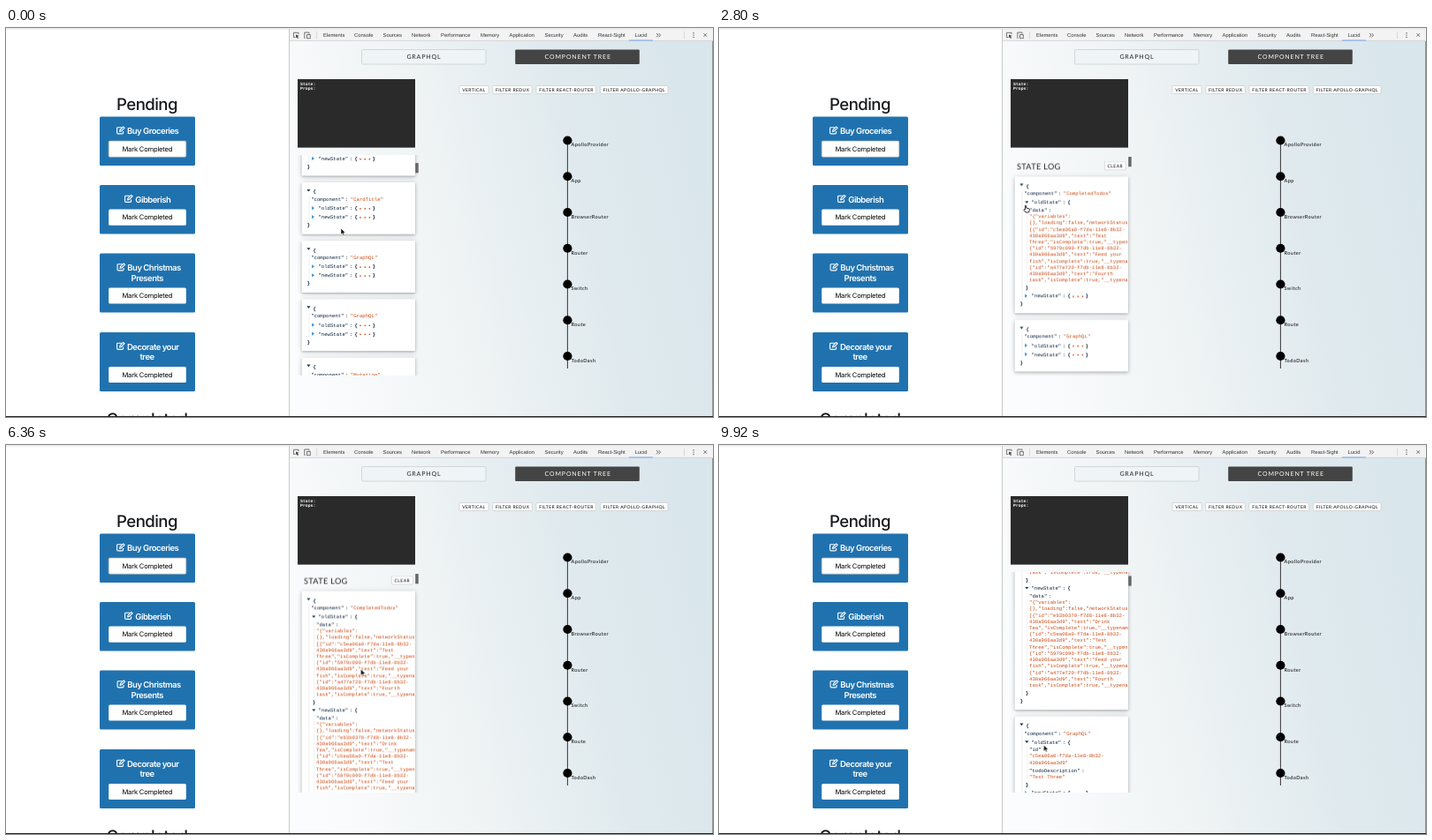
Recreate the animation shown at these times as an HTML page. Size 800 by 441 pixels, loop 10 s.

```html
<!DOCTYPE html>
<html lang="en">
<head>
<meta charset="utf-8">
<title>State log</title>
<style>
html, body { margin: 0; width: 100%; height: 100%; overflow: hidden; background: #fff; }
svg { display: block; width: 800px; height: 441px; text-rendering: geometricPrecision; }
text { white-space: pre; }
.ui { font-family: Inter, sans-serif; }
.head { font-size: 18.6px; font-weight: 500; letter-spacing: -.55px; fill: #16181b; text-anchor: middle; }
.title { font-size: 9.5px; font-weight: 600; letter-spacing: -.5px; fill: #fff; }
.mark { font-size: 7.6px; letter-spacing: -.2px; fill: #000; text-anchor: middle; }
.tab { font: 5.85px "Liberation Sans", Arial, sans-serif; fill: #333; }
.caps { font-family: Lato, sans-serif; fill: #222; }
.big { font-size: 7px; letter-spacing: .85px; }
.small { font-size: 5px; letter-spacing: .43px; fill: #000; }
.node { font: 5.6px Lato, sans-serif; letter-spacing: .43px; fill: #000; }
.con { font: bold 4.8px "Liberation Mono", monospace; fill: #fff; }
.code { font: 5.65px "Liberation Mono", "Courier New", monospace; }
.key { fill: #0a2340; }
.brace { fill: #0a2340; font-weight: bold; }
.str { fill: #cb4b16; }
.card { fill: #fff; filter: drop-shadow(0 1.5px 1.2px rgba(0, 0, 0, .24)) drop-shadow(0 1px 3px rgba(0, 0, 0, .16)); }
.guide { stroke: #e6e6e6; stroke-width: .6px; }

#list, #thumb, #pointer, #arrow, #hand, .view { animation: 10s linear infinite; }
#list { animation-name: scroll; }
#thumb { animation-name: thumb; }
#pointer { animation-name: move; }
#arrow, #hand, .view { animation-timing-function: step-end; }
#arrow { animation-name: arrow; }
#hand { animation-name: hand; }
#view0 { animation-name: v0; }
#view1 { animation-name: v1; }
#view2 { animation-name: v2; }
#view3 { animation-name: v3; }

@keyframes scroll {
  0% { transform: translateY(-256.3px); animation-timing-function: ease-out; }
  3% { transform: translateY(-620px); }
  4.2% { transform: translateY(-610px); }
  5.6% { transform: translateY(-540px); animation-timing-function: ease-out; }
  8.8%, 63% { transform: translateY(0); animation-timing-function: ease-in-out; }
  69%, 100% { transform: translateY(-141.3px); }
}
@keyframes thumb {
  0% { transform: translateY(7px); animation-timing-function: ease-out; }
  3% { transform: translateY(16.2px); }
  4.2% { transform: translateY(16px); }
  5.6% { transform: translateY(14px); animation-timing-function: ease-out; }
  8.8%, 63% { transform: translateY(0); animation-timing-function: ease-in-out; }
  69%, 100% { transform: translateY(2.5px); }
}
@keyframes move {
  0%, 10% { transform: translate(379px, 227px); animation-timing-function: ease-in-out; }
  20%, 31% { transform: translate(347px, 201px); animation-timing-function: ease-in-out; }
  40%, 51% { transform: translate(335px, 290px); animation-timing-function: ease-in-out; }
  54%, 57.5% { transform: translate(347px, 303px); animation-timing-function: ease-in-out; }
  62%, 74% { transform: translate(401.5px, 254px); animation-timing-function: ease-in-out; }
  84%, 89% { transform: translate(348px, 337px); animation-timing-function: ease-in-out; }
  94%, 100% { transform: translate(367.5px, 340px); }
}
@keyframes arrow {
  0%, 32%, 58%, 90%, 100% { opacity: 1; }
  19%, 53.4%, 83% { opacity: 0; }
}
@keyframes hand {
  0%, 32%, 58%, 90%, 100% { opacity: 0; }
  19%, 53.4%, 83% { opacity: 1; }
}
@keyframes v0 { 0% { opacity: 1; } 22%, 100% { opacity: 0; } }
@keyframes v1 { 0%, 56%, 100% { opacity: 0; } 22% { opacity: 1; } }
@keyframes v2 { 0%, 86%, 100% { opacity: 0; } 56% { opacity: 1; } }
@keyframes v3 { 0% { opacity: 0; } 86%, 100% { opacity: 1; } }
</style>
</head>
<body>
<svg viewBox="0 0 800 441">
  <defs>
    <linearGradient id="sky" x1="0" y1=".6" x2="1" y2=".4">
      <stop offset="0" stop-color="#fbfcfd"/>
      <stop offset=".35" stop-color="#f0f4f5"/>
      <stop offset=".7" stop-color="#e0eaee"/>
      <stop offset="1" stop-color="#d9e6ec"/>
    </linearGradient>
    <clipPath id="pane"><rect x="330" y="144" width="137" height="250"/></clipPath>
    <clipPath id="inner"><rect x="334" y="0" width="129" height="2000"/></clipPath>
    <g id="edit" fill="none" stroke="#fff" stroke-width="1.1">
      <path d="M6 1.2H1.8Q.6 1.2 .6 2.4V7.2Q.6 8.4 1.8 8.4H6.4Q7.6 8.4 7.6 7.2V5.4"/>
      <path d="M3.6 5.8 4 4 7.7.4 9.1 1.8 5.4 5.4Z"/>
    </g>
  </defs>
  <rect width="800" height="441" fill="#fff"/>
  <g id="todo" class="ui"></g>

  <rect x="320" y="14" width="480" height="427" fill="url(#sky)"/>
  <rect x="320" y="1.5" width="480" height="13" fill="#f3f3f3"/>
  <path d="M320 14.4H800M351.5 4V12.5M767.5 4V12.5" stroke="#ccc" stroke-width=".7"/>
  <path d="M0 1H800" stroke="#ddd"/>
  <path d="M320.5 1V440" stroke="#c8c8c8"/>
  <rect x="705" y="13.6" width="27" height=".8" fill="#5b93ea"/>
  <g fill="none" stroke="#555" stroke-width=".8">
    <path d="M327.5 10.5H325.5V5.3H331V7"/>
    <path d="M328 7.5 331.8 9 330 9.6 331 11.6 329.8 12 329 10.2 328 11Z" fill="#444" stroke="none"/>
    <path d="M338.5 11.5H337.8V5H343V6.5M340.5 7.5H344.3V11.7H340.5Z"/>
    <path d="M789.4 6.2 793 9.8M793 6.2 789.4 9.8"/>
  </g>
  <g fill="#555"><circle cx="778" cy="5.7" r=".7"/><circle cx="778" cy="8.1" r=".7"/><circle cx="778" cy="10.5" r=".7"/></g>
  <g id="tabs"></g>
  <path d="M736 6 738 8.2 736 10.4M738.6 6 740.6 8.2 738.6 10.4" fill="none" stroke="#444" stroke-width=".8"/>

  <rect x="402.5" y="24.5" width="140.5" height="16.5" rx="1" fill="#eff4f6" stroke="#c9d0d4" stroke-width=".8"/>
  <rect x="576.2" y="24.5" width="140.6" height="16.6" rx="1" fill="#444"/>
  <text class="caps big" x="453.4" y="35.4">GRAPHQL</text>
  <text class="caps big" x="609.6" y="35.4" style="fill:#fff">COMPONENT TREE</text>
  <g id="filters"></g>

  <rect x="330" y="58" width="133" height="77.6" fill="#2a2a2a"/>
  <text class="con" x="333" y="64.9">State:</text>
  <text class="con" x="333" y="70.1">Props:</text>
  <g id="tree"></g>

  <g clip-path="url(#pane)">
    <g id="list">
      <text class="caps" x="337" y="160.4" style="font-size:9.2px;letter-spacing:.3px">STATE LOG</text>
      <rect x="436.3" y="151.4" width="24" height="9.4" rx="1" fill="#fff" stroke="#c4c4c4" stroke-width=".6"/>
      <text class="caps small" x="439.6" y="157.9">CLEAR</text>
    </g>
    <rect id="thumb" x="463.2" y="146" width="3.5" height="11.3" rx=".6" fill="#666"/>
  </g>

  <path d="M799.6 15V441" stroke="#777" stroke-width=".8"/>
  <path d="M0 440.5H800" stroke="#222"/>

  <g id="pointer" stroke="#fff" stroke-width=".6">
    <path id="arrow" d="M0 0V7.2L1.6 5.7 2.7 8.2 3.9 7.7 2.8 5.3H5Z" fill="#000"/>
    <path id="hand" d="M-.6 .4Q0-.4 .6 .4V3L3.6 3.7Q4.4 4 4.3 5L3.7 8H0L-2.2 5.2Q-2 4.2-.6 5Z" fill="#fff" stroke="#000" stroke-width=".8"/>
  </g>
</svg>
<script>
const $ = id => document.getElementById(id);

function add(parent, tag, attrs, content) {
  const el = document.createElementNS('http://www.w3.org/2000/svg', tag);
  for (const k in attrs) el.setAttribute(k, attrs[k]);
  if (content) el.textContent = content;
  parent.appendChild(el);
  return el;
}
const text = (parent, cls, x, y, s) => add(parent, 'text', { class: cls, x, y }, s);
const box = (parent, x, y, width, height, attrs) =>
  add(parent, 'rect', { x, y, width, height, ...attrs });

// To-do column
const todo = $('todo');
text(todo, 'head', 159.5, 93.2, 'Pending');
text(todo, 'head', 159.5, 450, 'Completed');
[
  [100.5, 125, ['Buy Groceries', 137]],
  [178, 134, ['Gibberish', 146.3]],
  [255.5, 125.5, ['Buy Christmas', 137.3], ['Presents', 141.5]],
  [345, 125, ['Decorate your', 137], ['tree', 151.5]]
].forEach(([y, iconX, ...lines], i) => {
  const extra = (lines.length - 1) * 11.4;
  box(todo, 106, y, 108, 55.5 + extra, { rx: 1.5, fill: '#2072af' });
  add(todo, 'use', { href: '#edit', x: iconX, y: y + 11 });
  lines.forEach(([s, x], n) => text(todo, 'title', x, y + 19.6 + n * 11.4, s));
  box(todo, 116.2, y + 27.6 + extra, 87.6, 18.1,
    { rx: 1.5, fill: '#fff', stroke: i ? 'none' : '#b5b5b5', 'stroke-width': .7 });
  text(todo, 'mark', 159.8, y + 39.3 + extra, 'Mark Completed');
});

// Toolbar
[['Elements', 359], ['Console', 394], ['Sources', 426.5], ['Network', 459], ['Performance', 492],
 ['Memory', 537], ['Application', 569.5], ['Security', 609.5], ['Audits', 642],
 ['React-Sight', 670], ['Lucid', 711.5]
].forEach(([s, x]) => text($('tabs'), 'tab', x, 10.2, s));

[['VERTICAL', 513, 33], ['FILTER REDUX', 550.7, 44.5], ['FILTER REACT-ROUTER', 600, 67.3],
 ['FILTER APOLLO-GRAPHQL', 672.6, 76.4]
].forEach(([s, x, w]) => {
  box($('filters'), x, 65.5, w, 9, { rx: 1, fill: '#fff', stroke: '#c4c4c4', 'stroke-width': .6 });
  text($('filters'), 'caps small', x + 3.2, 71.8, s);
});

// Component tree
const tree = $('tree');
add(tree, 'path', { d: 'M635.4 127.5V386', stroke: '#222', 'stroke-width': .9 });
['ApolloProvider', 'App', 'BrowserRouter', 'Router', 'Switch', 'Route', 'TodoDash'].forEach((s, i) => {
  const y = 127.5 + 40.75 * i;
  add(tree, 'circle', { cx: 635.4, cy: y, r: 5.1 });
  text(tree, 'node', 639.5, y + 6.8, s);
});

// State log
const todoLines = (id, first, last) =>
  [`{"id":"${id}-11e8-8b32-`, `430a966aa3d9","text":"${first}`, `${last}","isComplete":true,"__typename"`];
const three = todoLines('c5ea06a0-f7da', 'Test', 'Three');
const rest = [...todoLines('5979c090-f7db', 'Feed your', 'fish'), ...todoLines('a477e720-f7db', 'Fourth', 'task')];
const query = items => [['data', ['"{"variables":', '{},"loading":false,"networkStatus"', '[' + items[0], ...items.slice(1)]]];
const oldData = query([...three, ...rest]);
const newData = query([...todoLines('eb3b0370-f7d8', 'Drink', 'Tea'), ...three, ...rest]);
const item = [['id', ['"c5ea06a0-f7da-11e8-8b32-', '430a966aa3d9"']], ['todoDescription', ['"Test Three"']]];

const names = ['CompletedTodos', 'GraphQL', 'GraphQL', 'Mutation', 'CardTitle', 'GraphQL', 'GraphQL',
  'Mutation', 'CompletedTodo', 'CompletedTodo', 'CardTitle', 'GraphQL', 'GraphQL', 'Mutation', 'CardTitle'];

function card(view, top, name, oldBody, newBody) {
  const back = box(view, 334.6, top, 128.4, 0, { class: 'card' });
  const g = add(view, 'g', { 'clip-path': 'url(#inner)' });
  const code = (cls, x, y, s) => text(g, 'code ' + cls, x, y + 1.9, s);
  const guide = (x, y1, y2) => add(g, 'path', { class: 'guide', d: `M${x} ${y1}V${y2}` });
  const down = (x, y) => add(g, 'path', { d: `M${x} ${y - 1.6}h4.2l-2.1 2.6z`, fill: '#163a4a' });

  // Draws one state row and returns the y of the row end.
  function state(key, y, body) {
    code('key', 353.4, y, `"${key}"`);
    code('key', 389, y, ':');
    code('brace', 394.6, y, '{');
    if (!body) {
      add(g, 'path', { d: `M346.2 ${y - 2.3}l2.7 2.1l-2.7 2.1z`, fill: '#268bd2' });
      for (let i = 0; i < 3; i++) add(g, 'circle', { cx: 401 + i * 5.2, cy: y + .5, r: .85, fill: '#cb4b16' });
      code('brace', 414.6, y, '}');
      return y;
    }
    down(346.2, y);
    let end = y - 1;
    for (const [k, lines] of body) {
      end += 9.5;
      code('key', 351, end, `"${k}"`);
      code('key', 351 + (k.length + 2) * 3.39 + 1.6, end, ':');
      end += 7.1;
      lines.forEach((s, i) => code('str', 351, end + i * 7.22, s));
      end += (lines.length - 1) * 7.22;
    }
    guide(348.8, y + 5, end + 3);
    end += 8.7;
    code('brace', 346.7, end, '}');
    return end;
  }

  down(340.3, top + 9.6);
  code('brace', 347.4, top + 10.5, '{');
  code('key', 345.2, top + 19.2, '"component"');
  code('key', 384, top + 19.2, ':');
  code('str', 389.8, top + 19.2, `"${name}"`);
  let y = state('oldState', top + 29.4, oldBody);
  y = state('newState', y + (oldBody ? 9.5 : 10), newBody);
  guide(343, top + 15, y + 4);
  code('brace', 340.6, y + 9, '}');
  const height = y + 19.4 - top;
  back.setAttribute('height', height);
  return top + height + 7.4;
}

[[], [oldData], [oldData, newData], [oldData, newData, item]].forEach(([a, b, c], n) => {
  const view = add($('list'), 'g', { id: 'view' + n, class: 'view' });
  names.reduce((y, name, i) => card(view, y, name, i == 0 ? a : i == 1 ? c : null, i == 0 ? b : null), 168.5);
});
</script>
</body>
</html>
```
